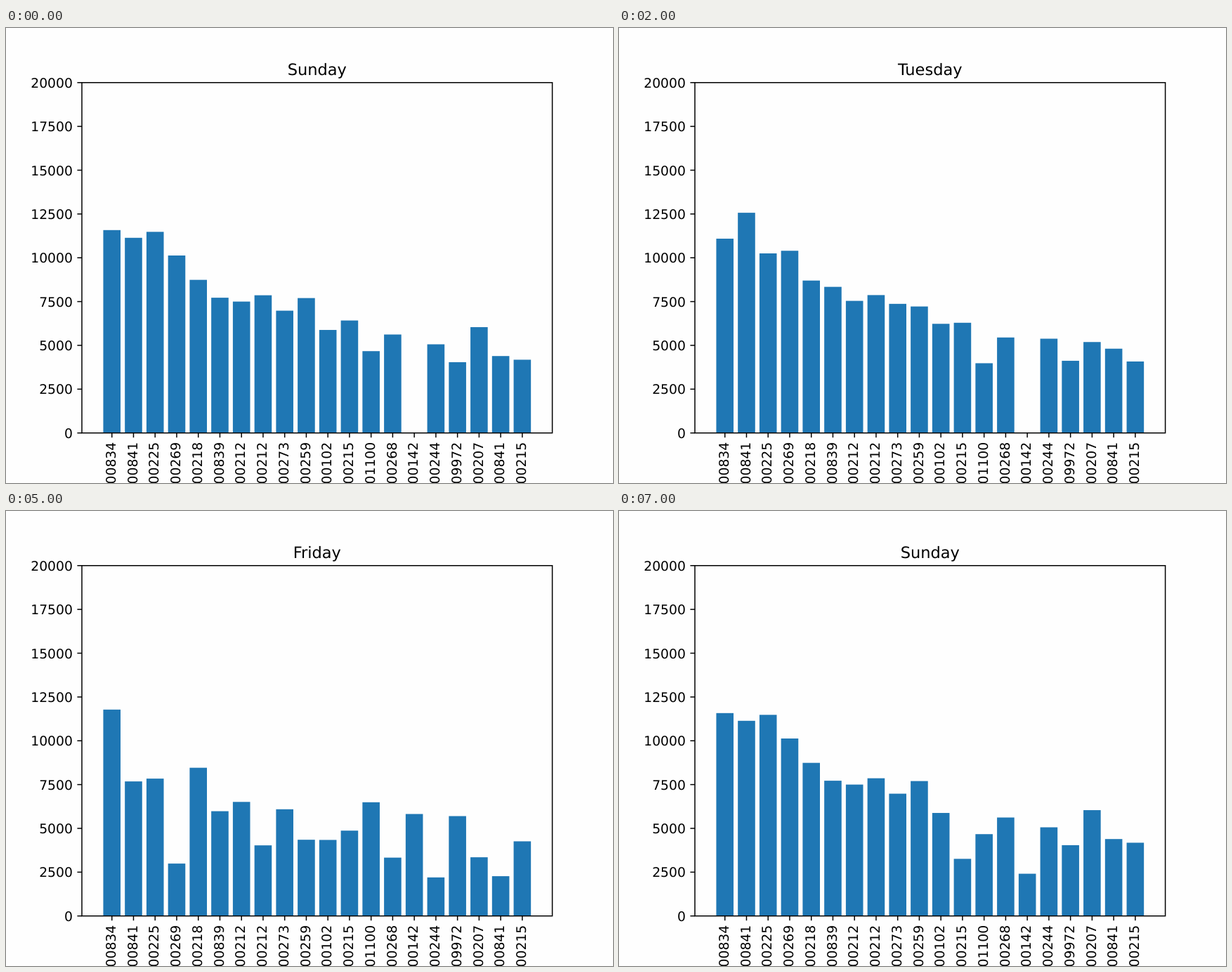
Write an HTML page with a canvas that moves like this. It is 864x648 px and loops after 8000 ms.

```html
<!DOCTYPE html>
<html lang="en">
<head>
<meta charset="utf-8">
<title>Daily bars</title>
<style>
  html, body { margin: 0; width: 100%; height: 100%; overflow: hidden; background: #fefefe; }
  canvas { display: block; }
</style>
</head>
<body>
<canvas id="stage" width="864" height="648"></canvas>
<script>
const ctx = document.getElementById('stage').getContext('2d');

const labels = ('00834 00841 00225 00269 00218 00839 00212 00212 00273 00259 ' +
  '00102 00215 01100 00268 00142 00244 09972 00207 00841 00215').split(' ');

// Three typical day shapes; each day changes only the bars that stand out.
const sunday = [11580, 11140, 11480, 10130, 8740, 7720, 7500, 7860, 6980, 7700,
  5880, 6420, 4670, 5620, 0, 5060, 4040, 6040, 4390, 4180];
const midweek = [11090, 12570, 10250, 10400, 8700, 8340, 7540, 7870, 7370, 7220,
  6230, 6290, 3980, 5450, 0, 5380, 4120, 5190, 4810, 4080];
const weekend = [11780, 7680, 7840, 2990, 8460, 5980, 6510, 4030, 6090, 4350,
  4340, 4870, 6490, 3330, 5820, 2200, 5700, 3350, 2270, 4260];

const vary = (shape, changes) => Object.assign([...shape], changes);

const days = [
  ['Sunday', sunday],
  ['Monday', midweek],
  ['Tuesday', midweek],
  ['Wednesday', vary(midweek, { 14: 5710 })],
  ['Thursday', vary(midweek, { 9: 4850, 11: 5390, 12: 4950, 14: 5710 })],
  ['Friday', weekend],
  ['Saturday', vary(weekend, { 1: 8730, 3: 6440, 9: 4970, 11: 6280, 14: 4610, 16: 5150 })],
  ['Sunday', vary(sunday, { 11: 3260, 14: 2410 })],
];

const DAY_MS = 1000;
const left = 108, right = 777.6, ceiling = 77.76, floor = 576.72;
const step = (right - left) / 21.78;
const tick = 6.56, labelGap = 13.1;
const barCenter = i => left + (i + 1.39) * step;
const yOf = value => floor - value * (floor - ceiling) / 20000;

function line(x1, y1, x2, y2) {
  ctx.beginPath();
  ctx.moveTo(x1, y1);
  ctx.lineTo(x2, y2);
  ctx.stroke();
}

function text(str, x, y, align, size = 18.75, angle = 0) {
  ctx.save();
  ctx.translate(x, y);
  ctx.rotate(angle);
  ctx.font = `${size}px "DejaVu Sans", sans-serif`;
  ctx.textRendering = 'geometricPrecision';
  ctx.textAlign = align;
  ctx.fillText(str, 0, 0);
  ctx.restore();
}

function drawBars(values) {
  ctx.fillStyle = '#1f77b4';
  values.forEach((value, i) => {
    ctx.fillRect(barCenter(i) - 0.4 * step, yOf(value), 0.8 * step, floor - yOf(value));
  });
}

function drawAxes() {
  ctx.fillStyle = ctx.strokeStyle = '#000';
  ctx.lineWidth = 1.5;
  for (let value = 0; value <= 20000; value += 2500) {
    const y = yOf(value);
    line(left - tick, y, left, y);
    text(value, left - labelGap, y + 7.1, 'right');
  }
  labels.forEach((label, i) => {
    const x = barCenter(i);
    line(x, floor, x, floor + tick);
    text(label, x + 5.2, floor + labelGap, 'right', 18.75, -Math.PI / 2);
  });
  ctx.strokeRect(left, ceiling, right - left, floor - ceiling);
}

function draw(now) {
  const [name, values] = days[Math.floor(now / DAY_MS) % days.length];
  ctx.fillStyle = '#fefefe';
  ctx.fillRect(0, 0, 864, 648);
  drawBars(values);
  drawAxes();
  text(name, (left + right) / 2, 66.5, 'center', 22.5);
  requestAnimationFrame(draw);
}
requestAnimationFrame(draw);
</script>
</body>
</html>
```
